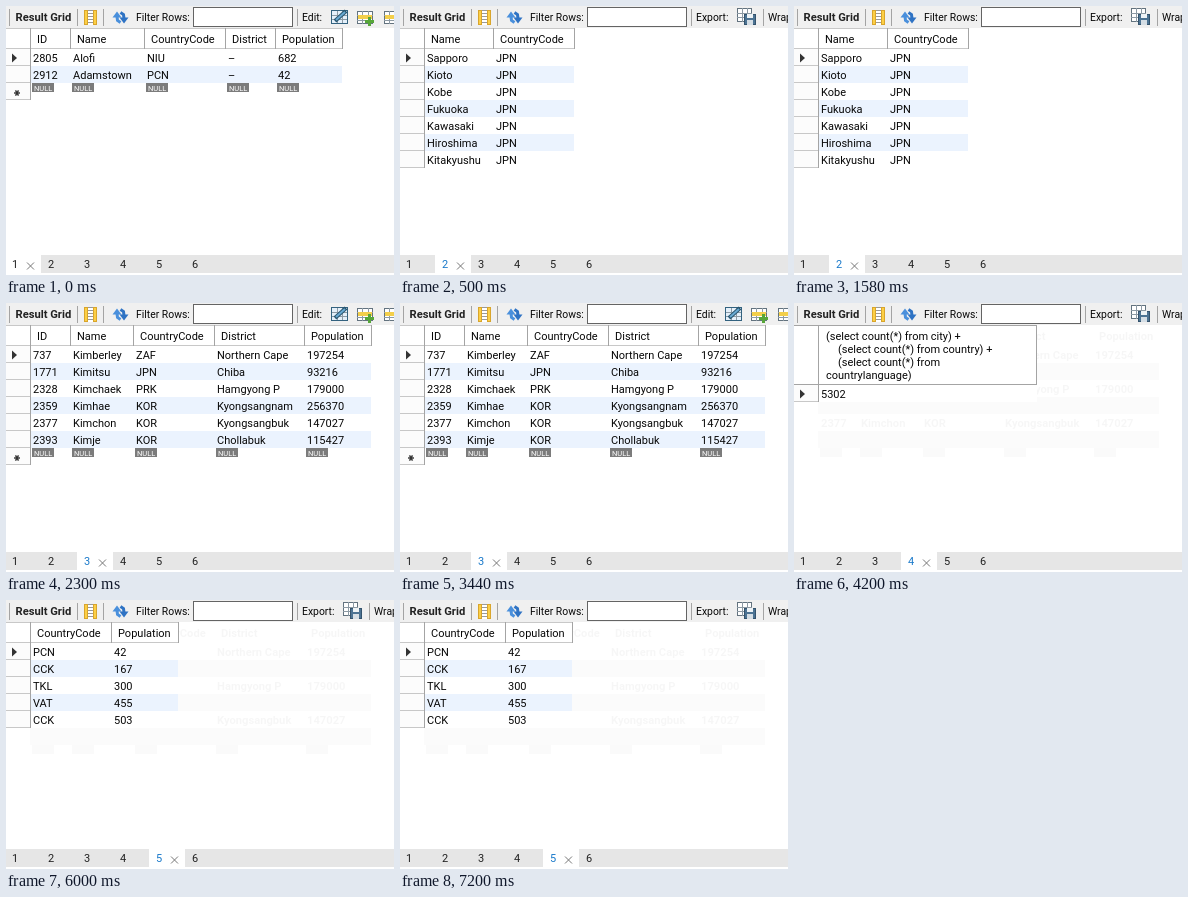
An HTML page with a canvas that plays this animation: 388 by 269 pixels, repeating every 8 s.

```html
<!DOCTYPE html>
<html lang="en">
<head>
<meta charset="utf-8">
<title>Result grids</title>
<style>
html, body { margin: 0; height: 100%; overflow: hidden; background: #fff; }
canvas { display: block; }
</style>
</head>
<body>
<canvas id="stage" width="388" height="269"></canvas>
<script>
const ctx = document.getElementById('stage').getContext('2d');
const FAMILY = 'Roboto, "Noto Sans", sans-serif';
const FONT = '11px ' + FAMILY;
const SMALL = '10.4px ' + FAMILY;
const BOLD = 'bold 11.2px ' + FAMILY;
const INK = '#080808', LINE = '#c8c8c8', EDGE = '#a4a4a4', BLUE = '#1979ca';
const TOP = 43, ROW = 17;

const cities = {
  cols: [24, 64, 127, 208, 298, 365],
  head: ['ID', 'Name', 'CountryCode', 'District', 'Population'],
  rows: [
    ['737', 'Kimberley', 'ZAF', 'Northern Cape', '197254'],
    ['1771', 'Kimitsu', 'JPN', 'Chiba', '93216'],
    ['2328', 'Kimchaek', 'PRK', 'Hamgyong P', '179000'],
    ['2359', 'Kimhae', 'KOR', 'Kyongsangnam', '256370'],
    ['2377', 'Kimchon', 'KOR', 'Kyongsangbuk', '147027'],
    ['2393', 'Kimje', 'KOR', 'Chollabuk', '115427']
  ],
  editable: true
};

const scenes = [
  { end: 500, tab: 0, table: {
    cols: [24, 64, 138, 219, 269, 336],
    head: cities.head,
    rows: [['2805', 'Alofi', 'NIU', '–', '682'], ['2912', 'Adamstown', 'PCN', '–', '42']],
    editable: true
  } },
  { end: 2300, tab: 1, table: {
    cols: [24, 93, 174],
    head: ['Name', 'CountryCode'],
    rows: ['Sapporo', 'Kioto', 'Kobe', 'Fukuoka', 'Kawasaki', 'Hiroshima', 'Kitakyushu'].map(n => [n, 'JPN'])
  } },
  { end: 4200, tab: 2, table: cities },
  { end: 6000, tab: 3, ghost: true },
  { end: 8000, tab: 4, ghost: true, table: {
    cols: [24, 105, 172],
    head: ['CountryCode', 'Population'],
    rows: [['PCN', '42'], ['CCK', '167'], ['TKL', '300'], ['VAT', '455'], ['CCK', '503']]
  } }
];

function box(x, y, w, h, fill, stroke) {
  if (fill) { ctx.fillStyle = fill; ctx.fillRect(x, y, w, h); }
  if (stroke) {
    ctx.strokeStyle = stroke;
    ctx.lineWidth = 1;
    ctx.strokeRect(x + .5, y + .5, w - 1, h - 1);
  }
}
const hline = (x, y, w, c = LINE) => box(x, y, w, 1, c);
const vline = (x, y, h, c = LINE) => box(x, y, 1, h, c);

function text(s, x, y, color = INK, font = FONT) {
  ctx.font = font;
  ctx.fillStyle = color;
  ctx.fillText(s, x, y);
}

function poly(points, fill) {
  ctx.fillStyle = fill;
  ctx.beginPath();
  points.forEach(([x, y]) => ctx.lineTo(x, y));
  ctx.fill();
}

function stroke(points, color, width) {
  ctx.strokeStyle = color;
  ctx.lineWidth = width;
  ctx.beginPath();
  points.forEach(([x, y]) => ctx.lineTo(x, y));
  ctx.stroke();
}

function sheet(x, y, w, h, fill = '#fff') {
  box(x, y, w, h, fill, '#63737f');
  for (let i = 1; i < 3; i++) {
    vline(x + Math.round(w * i / 3), y, h, '#8d9aa4');
    hline(x, y + Math.round(h * i / 3), w, '#8d9aa4');
  }
}

function columnsIcon() {
  box(78, 4, 13, 15, '#fff');
  for (const x of [78, 87]) box(x, 4, 4, 15, '#fccf45', '#d9a52c');
  for (let y = 4; y < 19; y += 3) hline(82, y, 5, '#9a9a9a');
}

// Two blue arrows, each the other turned by half a turn
function refreshIcon() {
  for (const side of [0, 1]) {
    ctx.save();
    ctx.translate(114.5, 11.5);
    ctx.rotate(side * Math.PI);
    const color = side ? '#2f73c4' : '#4a90dc';
    poly([[-8, 0], [-3.5, -6], [1, 0]], color);
    stroke([[-3.5, -1], [-3, 3], [0, 5]], color, 3);
    ctx.restore();
  }
}

function editIcons() {
  text('Edit:', 296, 15, INK, SMALL);
  sheet(325, 4, 17, 14, '#e4f0fa');
  box(325, 4, 17, 14, null, '#33627f');
  stroke([[329, 15], [340, 5]], '#28556f', 4);
  stroke([[330, 14], [339, 6]], '#69a9d2', 2);
  sheet(351, 5, 16, 13);
  box(352, 9, 14, 4, '#f3cf4b');
  box(362, 11, 3, 9, '#57a639');
  box(359, 14, 9, 3, '#57a639');
  sheet(378, 5, 16, 13);
  box(379, 9, 14, 4, '#f3cf4b');
}

function exportIcons() {
  text('Export:', 296, 15, INK, SMALL);
  sheet(337, 2, 15, 14);
  box(344, 8, 12, 11, '#4c7393', '#34536d');
  box(347, 8, 6, 4, '#eef3f6');
  box(347, 14, 6, 5, '#d5dee5');
  vline(363, 3, 17, EDGE);
  text('Wrap', 368, 15, INK, SMALL);
}

function toolbar(editable) {
  box(0, 0, 388, 22, '#f0f0f0');
  [3, 71, 97, 291].forEach(x => vline(x, 3, 17, EDGE));
  text('Result Grid', 9.5, 15, '#222', BOLD);
  columnsIcon();
  refreshIcon();
  text('Filter Rows:', 130, 15, INK, SMALL);
  box(187, 1, 100, 20, '#fff', '#646464');
  editable ? editIcons() : exportIcons();
}

function pointer(y) {
  poly([[6, y - 4.5], [11, y], [6, y + 4.5]], '#333');
}

function rowHeads(top, count) {
  box(0, top, 24, count * ROW, '#fcfcfc');
  for (let i = 1; i <= count; i++) hline(0, top + i * ROW - 1, 24);
  vline(24, top, count * ROW, EDGE);
  pointer(top + 9);
}

function nullMark(x, y) {
  box(x, y, 22, 9, '#7b7b7b');
  text('NULL', x + 2, y + 7.5, '#fff', '7.5px ' + FAMILY);
}

function grid({ cols, head, rows, editable }) {
  const right = cols[cols.length - 1];
  const count = rows.length + (editable ? 1 : 0);
  box(0, 22, right, 21 + count * ROW, '#fff');
  rows.forEach((_, i) => {
    if (i % 2) box(25, TOP + i * ROW, right - 25, ROW, '#ebf3fe');
  });
  hline(0, 22, right);
  hline(0, TOP - 1, right);
  rowHeads(TOP, count);
  cols.forEach(x => vline(x, 22, 21, EDGE));
  head.forEach((s, i) => text(s, cols[i] + 7, 37));
  rows.forEach((row, r) => row.forEach((s, i) => text(s, cols[i] + 3, TOP + r * ROW + 13)));
  if (!editable) return;
  const y = TOP + rows.length * ROW;
  head.forEach((_, i) => nullMark(cols[i] + 2, y));
  for (let i = 0; i < 3; i++) {
    const a = i * Math.PI / 3, dx = 3 * Math.cos(a), dy = 3 * Math.sin(a);
    stroke([[11 - dx, y + 10 - dy], [11 + dx, y + 10 + dy]], '#333', 1.4);
  }
}

// Faint remains of the city table
function ghost() {
  const { cols, head, rows } = cities;
  ctx.globalAlpha = .035;
  head.forEach((s, i) => text(s, cols[i] + 7, 37, '#000', BOLD));
  rows.forEach((row, r) => {
    const y = TOP + r * ROW;
    if (r % 2) box(24, y, 341, ROW, '#999');
    else row.forEach((s, i) => text(s, cols[i] + 3, y + 13, '#000', BOLD));
  });
  head.forEach((_, i) => nullMark(cols[i] + 2, 145));
  ctx.globalAlpha = 1;
}

function sumGrid() {
  box(0, 22, 243, 77, '#fff');
  hline(0, 22, 243, EDGE);
  hline(0, 81, 243, EDGE);
  vline(24, 22, 60, EDGE);
  vline(242, 22, 60, EDGE);
  rowHeads(82, 1);
  text('(select count(*) from city) +', 32, 37);
  text('(select count(*) from country) +', 44, 50);
  text('(select count(*) from', 44, 63);
  text('countrylanguage)', 32, 76);
  text('5302', 27, 95);
}

function tabs(active) {
  box(0, 249, 388, 18, '#e6e6e6');
  box(active * 36 - 1, 249, 36, 18, '#fff');
  for (let i = 0; i < 6; i++) {
    text(i + 1, 6 + i * 36, 262, i === active && i ? BLUE : '#222');
  }
  const x = active * 36 + 24.5, y = 260;
  stroke([[x - 3.5, y - 3.5], [x + 3.5, y + 3.5]], '#777', 1);
  stroke([[x + 3.5, y - 3.5], [x - 3.5, y + 3.5]], '#777', 1);
}

function draw(now) {
  const t = now % 8000;
  const scene = scenes.find(s => t < s.end);
  box(0, 0, 388, 269, '#fff');
  if (scene.ghost) ghost();
  toolbar(scene.table && scene.table.editable);
  scene.table ? grid(scene.table) : sumGrid();
  tabs(scene.tab);
}

const start = performance.now();
function tick() {
  draw(performance.now() - start);
  requestAnimationFrame(tick);
}
tick();
</script>
</body>
</html>
```
